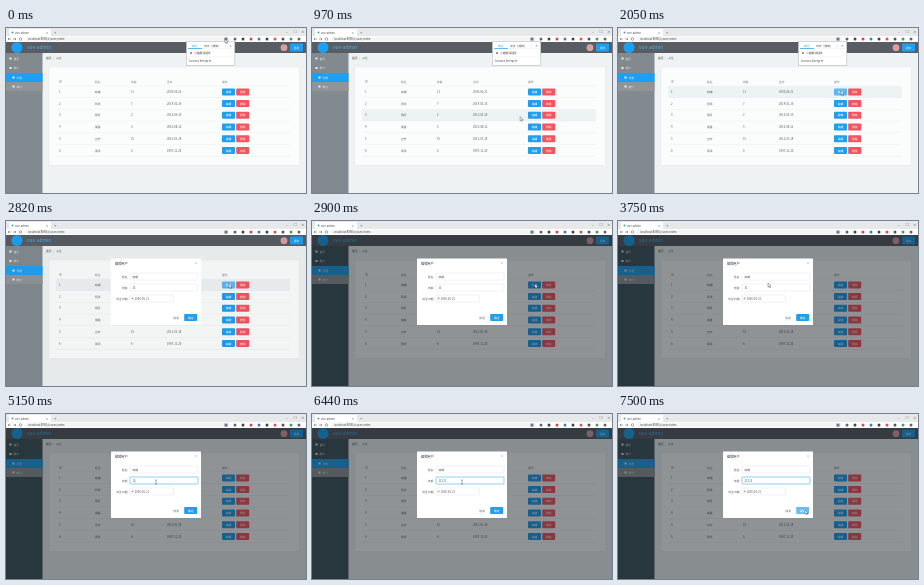
Recreate the animation shown at these times as an HTML page. Size 300 by 165 pixels, loop 8 s.

```html
<!DOCTYPE html>
<html lang="zh">
<head>
<meta charset="utf-8">
<style>
html, body { margin: 0; width: 100%; height: 100%; overflow: hidden; background: #eef2f3; }
svg { display: block; width: 100vw; height: 100vh; }
text { font-family: "Noto Sans CJK SC", "Noto Sans CJK", "Noto Sans", sans-serif; }
</style>
</head>
<body>
<svg id="stage" viewBox="0 0 300 165"></svg>
<script>
const stage = document.getElementById('stage');
const BLUE = '#1f9fef', RED = '#f25560';

function add(parent, tag, attrs) {
  const el = document.createElementNS('http://www.w3.org/2000/svg', tag);
  for (const k in attrs) el.setAttribute(k, attrs[k]);
  return parent.appendChild(el);
}
const group = parent => add(parent, 'g', {});
const rect = (p, x, y, width, height, fill, more) => add(p, 'rect', { x, y, width, height, fill, ...more });
const dot = (p, cx, cy, r, fill) => add(p, 'circle', { cx, cy, r, fill });
const line = (p, d, stroke, width = 0.5) => add(p, 'path', { d, stroke, fill: 'none', 'stroke-width': width });
function text(p, x, y, str, fill = '#555', size = 2.8, anchor = 'start') {
  const el = add(p, 'text', { x, y, fill, 'font-size': size, 'text-anchor': anchor });
  el.textContent = str;
  return el;
}
function button(p, x, y, label, fill) {
  const box = rect(p, x, y, 13, 7, fill, { rx: 0.8 });
  text(p, x + 6.5, y + 4.6, label, '#fff', 2.8, 'middle');
  return box;
}

// Page
const page = group(stage);
rect(page, 0, 14, 300, 151, '#eef2f3');
rect(page, 0, 14, 300, 11, '#575d62');
dot(page, 11, 19.5, 5.5, BLUE);
text(page, 21, 21, 'vue-admin', '#45b4f7', 4.8);
dot(page, 278, 19.7, 3.4, '#d8a0a2');
rect(page, 284, 15.5, 13, 8, BLUE, { rx: 0.8 });
text(page, 290.5, 20.6, '退出', '#fff', 2.8, 'middle');

const sidebar = rect(page, 0, 25, 36.5, 140, '#828a8f');
rect(page, 0, 45, 36.5, 9, BLUE);
rect(page, 0, 54, 36.5, 9, '#909496');
['首页', '用户', '列表', '统计'].forEach((label, i) => {
  const y = [30.5, 40, 49.5, 58.5][i];
  const x = 3.5 + (i > 1) * 3;
  rect(page, x, y - 1, 2, 2, '#eef0f1');
  text(page, x + 4, y + 1, label, '#eef0f1');
});

text(page, 40, 31, '首页', '#333');
text(page, 47, 31, '/', '#999');
text(page, 50, 31, '占位', '#666');
rect(page, 43, 39, 250.5, 98.5, '#fbfcfc', { stroke: '#e3e8ea', 'stroke-width': 0.5 });

const columns = [53, 89, 125, 161, 216];
['ID', '姓名', '年龄', '生日', '操作'].forEach((s, i) => text(page, columns[i], 55, s, '#777'));
line(page, 'M50 58.2H284', '#e4e7ea');
const people = [
  ['晓晴', 11, '2000-06-21'], ['阿禾', 7, '2014-02-16'], ['明月', 2, '2016-05-10'],
  ['南星', 5, '2010-08-12'], ['云开', 15, '2012-01-18'], ['青禾', 6, '1997-11-20']
];
const rowTop = i => 58.3 + i * 11.7;
const rows = people.map((person, i) => {
  const y = rowTop(i);
  const bg = rect(page, 50, y, 234, 11.4, '#fbfcfc');
  line(page, `M50 ${y + 11.5}H284`, '#e4e7ea');
  [i + 1, ...person].forEach((s, c) => text(page, columns[c], y + 6.7, s));
  const edit = button(page, 216, y + 2.1, '编辑', BLUE);
  button(page, 230.2, y + 2.1, '删除', RED);
  return { bg, edit };
});

// Browser frame
rect(stage, 0, 0, 300, 8, '#e6e8ea');
rect(stage, 3, 1, 42, 7, '#fff', { rx: 1 });
dot(stage, 6.5, 4.5, 1, '#49a982');
text(stage, 9, 5.5, 'vue-admin', '#444');
text(stage, 41, 5.5, '×', '#555', 3, 'middle');
text(stage, 48, 5.7, '+', '#555', 4);
['–', '□', '×'].forEach((s, i) => text(stage, 280 + i * 7.5, 5, s, '#444', 3.5));
rect(stage, 0, 8, 300, 6, '#fff');
rect(stage, 19, 8.8, 205, 4.4, '#f3f4f5', { rx: 2 });
line(stage, 'M5 11H2M3.2 9.8L2 11L3.2 12.2M7 11H10M8.8 9.8L10 11L8.8 12.2', '#555');
add(stage, 'circle', { cx: 14.5, cy: 11, r: 1.3, fill: 'none', stroke: '#555', 'stroke-width': 0.5 });
text(stage, 22, 12.1, 'localhost:8080/#/user/index', '#444');
rect(stage, 218.5, 9.6, 3, 3, '#697a8c');
['#666', '#444', '#d8454b', '#4779bb', '#444', '#db5450', '#555', '#4e9c64', '#666'].forEach(
  (fill, i) => dot(stage, 229 + i * 8, 11, 1.5, fill));

// Extension popup
const popup = group(stage);
rect(popup, 180.3, 13.5, 48.5, 24, '#fff', { stroke: '#a9adb0', 'stroke-width': 0.5 });
text(popup, 186, 18.5, '网页', BLUE);
text(popup, 198, 18.5, '中文（简体）', '#444');
line(popup, 'M182 20.6H227M182 28.8H227', '#ddd', 0.3);
rect(popup, 182, 20, 14, 0.7, BLUE);
text(popup, 218, 18.5, '⋮', '#444');
text(popup, 223, 18.5, '×', '#444', 3);
rect(popup, 184, 24, 2, 2, '#999');
text(popup, 188, 26.1, '小猫翻译插件', '#444');
text(popup, 183, 34, 'Lumora Interpret', '#444');

// Dialog
const shade = rect(stage, 0, 14, 300, 151, '#0c1218');
const dialog = group(stage);
rect(dialog, 105, 37.5, 90, 66.5, '#fff', { rx: 0.6 });
text(dialog, 109, 44, '编辑用户', '#333', 3.2);
text(dialog, 190, 43.3, '×', '#888', 3.2, 'middle');
const field = (y, width) =>
  rect(dialog, 124, y, width, 7, '#fff', { rx: 0.6, stroke: '#e0e3e8', 'stroke-width': 0.5 });
field(52, 68);
const ageBox = field(63, 68);
field(74, 43.5);
[['姓名', 56.6], ['年龄', 67.6], ['出生日期', 78.6]].forEach(
  ([s, y]) => text(dialog, 121.5, y, s, '#555', 2.8, 'end'));
text(dialog, 126.5, 56.6, '晓晴', '#444');
const age = text(dialog, 126.5, 67.6, '', '#444');
rect(dialog, 125.7, 76.5, 1.7, 1.9, '#aaa');
text(dialog, 128.7, 78.6, '2000-06-21', '#555');
text(dialog, 170, 97.6, '取消', '#555', 2.8, 'middle');
const confirm = button(dialog, 178.2, 93, '确定', BLUE);

// Pointers
const arrow = add(stage, 'path', {
  d: 'M0 0V4.2L1 3.3L1.7 4.8L2.4 4.5L1.7 3.1H3Z', fill: '#fff', stroke: '#222', 'stroke-width': 0.35
});
const beam = line(stage, 'M-.9 -2H.9M0 -2V2M-.9 2H.9', '#333', 0.4);

// time, x, y
const path = [
  [0, 219, 11], [40, 219, 11], [810, 207, 91], [1640, 219, 66], [1810, 219, 66], [2050, 223, 63],
  [2900, 223, 63], [3390, 167, 67], [3750, 150, 62], [3950, 150, 62], [4240, 150, 68],
  [6730, 150, 68], [7450, 187, 96], [8001, 187, 96]
];
const clamp = v => Math.max(0, Math.min(1, v));

function pointerAt(t) {
  const i = path.findIndex(p => p[0] > t);
  const a = path[i - 1], b = path[i];
  const k = (t - a[0]) / (b[0] - a[0]);
  const e = k * k * (3 - 2 * k);
  return [a[1] + (b[1] - a[1]) * e, a[2] + (b[2] - a[2]) * e];
}

function draw(t) {
  const [x, y] = pointerAt(t);
  const open = clamp((t - 2640) / 180);
  const dim = clamp((t - 2815) / 85);

  rows.forEach(({ bg, edit }, i) => {
    const over = t < 2900 && y >= rowTop(i) && y < rowTop(i + 1);
    bg.setAttribute('fill', over ? '#edf2f5' : '#fbfcfc');
    edit.setAttribute('fill', over && x > 216 && x < 229 && t > 1810 ? '#5cb8f5' : BLUE);
  });
  popup.setAttribute('visibility', t < 2640 ? 'visible' : 'hidden');
  shade.setAttribute('opacity', dim * 0.45);
  sidebar.setAttribute('fill', dim > 0.5 ? '#40565e' : '#828a8f');
  dialog.setAttribute('opacity', open);
  dialog.setAttribute('transform', `translate(0 ${-2.5 * (1 - open) ** 2})`);

  ageBox.setAttribute('stroke', t >= 4680 ? BLUE : '#e0e3e8');
  const typed = [5670, 6160, 6440].filter(at => t >= at).length;
  age.textContent = '11' + '1'.repeat(typed) + (t >= 5150 && t < 5670 ? '|' : '');
  confirm.setAttribute('fill', x > 178 && y > 92 && t > 6730 ? '#68bdf5' : BLUE);

  const inField = t > 3000 && x > 124 && x < 192 && y > 63 && y < 70;
  arrow.setAttribute('visibility', inField ? 'hidden' : 'visible');
  beam.setAttribute('visibility', inField ? 'visible' : 'hidden');
  (inField ? beam : arrow).setAttribute('transform', `translate(${x} ${y})`);
}

const start = performance.now();
function tick() {
  draw((performance.now() - start) % 8000);
  requestAnimationFrame(tick);
}
tick();
</script>
</body>
</html>
```
